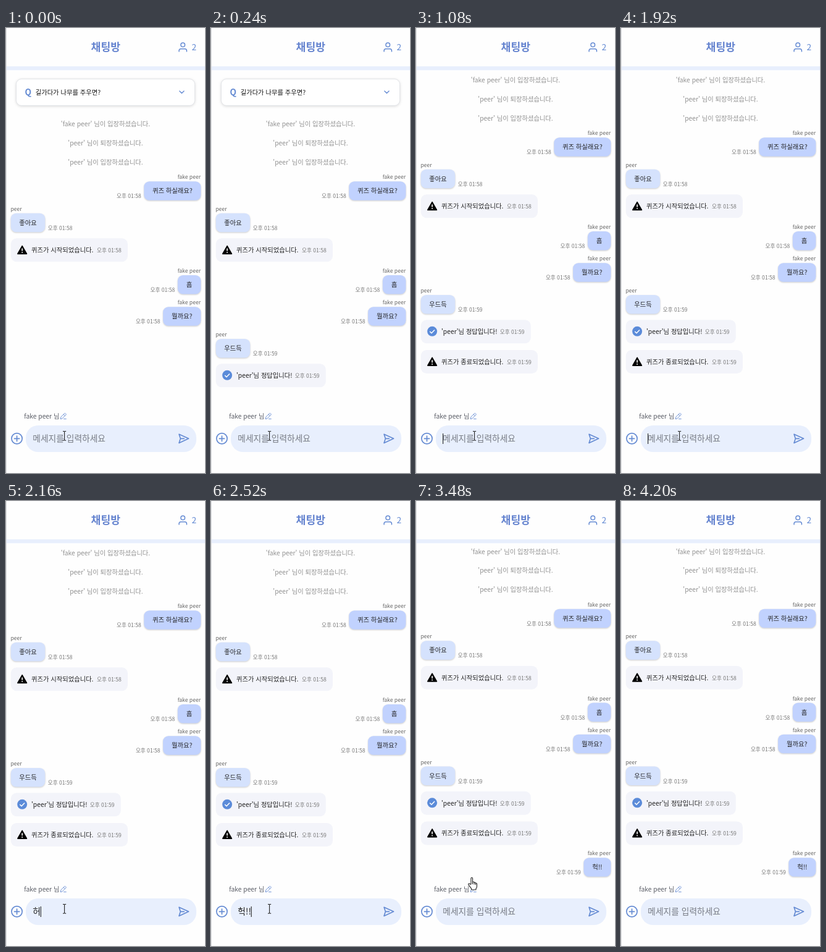
These frames come from a looping animation (322x720 px, 4680 ms). An HTML page:

```html
<!DOCTYPE html>
<html lang="ko">
<head>
<meta charset="utf-8">
<title>채팅방</title>
<style>
  html, body { margin: 0; width: 100%; height: 100%; overflow: hidden; background: #fefefe; }
  svg { display: block; font-family: "Noto Sans CJK KR", "Noto Sans CJK", "Noto Sans", sans-serif; }
  text { white-space: pre; }
  .bubble { filter: drop-shadow(0 1px 1.3px #0003); }
  .card { filter: drop-shadow(0 1px 2px #0002); }
  .line { fill: none; stroke: #658bd3; stroke-linecap: round; stroke-linejoin: round; }
</style>
</head>
<body>
<svg id="stage" width="322" height="720" viewBox="0 0 322 720">
  <g id="chat"></g>
  <g id="quiz">
    <rect class="card" x="16.5" y="82.5" width="289" height="43" rx="8.6" fill="#fff" stroke="#dfe1e6" stroke-width=".9"/>
    <path class="line" d="M280.8 102l3.6 3.6 3.6-3.6" stroke-width="1.4"/>
  </g>
  <g id="header">
    <rect y="62" width="322" height="6.3" fill="#e8effd"/>
    <g class="line" stroke-width="1.5">
      <circle cx="286.2" cy="27.2" r="3.3"/>
      <path d="M280 38v-1.2q0-3.1 3.1-3.1h6.2q3.1 0 3.1 3.1V38"/>
    </g>
  </g>
  <g id="footer">
    <rect x="32" y="643" width="276" height="43" rx="20" fill="#e8effd"/>
    <g class="line">
      <g stroke-width="1.7">
        <circle cx="17.6" cy="664.3" r="8.6"/>
        <path d="M13.5 664.3h8.2M17.6 660.2v8.2"/>
        <path d="M280 657.2l15.5 7.1-15.5 7.1 2.3-7.1zM282.3 664.3h6"/>
      </g>
      <path d="M88.3 632.3l.6-3 5.7-5.6q.8-.7 1.6 0l.7.7q.7.8 0 1.6l-5.7 5.6zM93.2 625.2l2.3 2.3M93.5 632.5h3.8" stroke-width=".9"/>
    </g>
  </g>
  <path id="caret" d="M0 656v17" stroke="#222" stroke-width="1.1"/>
  <path id="beam" d="M92 652.5h1.7l.9.8.9-.8h1.7M94.6 653v13.500M92 667.200h1.700l.9-.8.9.8h1.700" fill="none" stroke="#222" stroke-width="1.1"/>
  <path id="hand" fill="#fff" stroke="#222" stroke-width="1.1" stroke-linejoin="round"
    d="M89 620v-9.300q0-1.500 1.300-1.500t1.300 1.500v5.800q2.300-.9 2.600.9 2-.8 2.300.9 2-.5 2 1.300v4.200q0 2.200-1.500 3.200v2h-7.200v-1.700l-4.600-6q-.9-1.500.3-2.200 1.200-.5 2.300 1zM91.600 616v4M94.200 617v3.500M96.500 618v3"/>
  <rect width="1" height="720" fill="#dcdde1"/>
</svg>
<script>
const LOOP = 4680;
const SMALL = 8.6, BODY = 10.3, INPUT = 13.75;
const BLUE = '#658bd3', GREY = '#777', INK = '#222';
const ME = 'fake peer', OTHER = 'peer';
const $ = id => document.getElementById(id);
const chat = $('chat');

function add(parent, tag, attrs, content = '') {
  const el = document.createElementNS('http://www.w3.org/2000/svg', tag);
  for (const key in attrs) el.setAttribute(key, attrs[key]);
  el.textContent = content;
  return parent.appendChild(el);
}

// Text is placed by its vertical centre.
const label = (parent, content, x, cy, size, fill, anchor = 'start', weight = 400) =>
  add(parent, 'text', { x, y: cy + size * .37, 'font-size': size, fill,
    'text-anchor': anchor, 'font-weight': weight }, content);

const timed = [];
function group(from) {
  const g = add(chat, 'g', {});
  if (from) timed.push([g, from]);
  return g;
}

function stamp(g, minute, x, cy, anchor) {
  label(g, '오후 01:' + minute, x, cy, SMALL, GREY, anchor);
}

function message(content, mine, y, width, minute, from = 0) {
  const g = group(from), x = mine ? 315.3 - width : 7.8;
  const anchor = mine ? 'end' : 'start';
  label(g, mine ? ME : OTHER, mine ? 315 : 7.5, y, SMALL, '#666', anchor);
  add(g, 'rect', { class: 'bubble', x, y: y + 7, width, height: 30.500, rx: 8.600,
    fill: mine ? '#c1d2fe' : '#d5e2fd' });
  label(g, content, x + width / 2, y + 22.2, BODY, INK, 'middle');
  stamp(g, minute, mine ? x - 4.5 : x + width + 4.5, y + 31, anchor);
}

function notice(content, y, width, minute, correct, from = 0) {
  const g = group(from), cy = y + 19;
  add(g, 'rect', { x: 7.8, y, width, height: 38, rx: 9.500, fill: '#f3f4fa' });
  if (correct) {
    add(g, 'circle', { cx: 26.2, cy: cy - .5, r: 8, fill: '#5b8bd9' });
    add(g, 'path', { d: `M22.400 ${cy - .3}l2.700 2.700 5-5.200`, fill: 'none', stroke: '#fff', 'stroke-width': 1.600 });
  } else {
    add(g, 'path', { d: `M26.200 ${cy - 6.700}l7.300 12.800h-14.600z`, fill: '#000', stroke: '#000',
      'stroke-width': 1.600, 'stroke-linejoin': 'round' });
    add(g, 'path', { d: `M26.200 ${cy - 2.800}v4.200M26.200 ${cy + 3}v1.700`, stroke: '#fff', 'stroke-width': 1.600 });
  }
  label(g, content, 41, cy, BODY, INK);
  stamp(g, minute, width - 2.5, cy + .7, 'end' && 'end') ;
}

label($('header'), '채팅방', 161.3, 31, 17.2, '#6483cf', 'middle', 700);
label($('header'), '2', 300.5, 31, INPUT, BLUE);
label($('quiz'), 'Q', 30.5, 104, INPUT, BLUE, 'start', 700);
label($('quiz'), '길가다가 나무를 주우면?', 47.700, 104, BODY, '#111', 'start', 500);
label($('footer'), ME + ' 님', 29.3, 628.3, BODY, '#5a5d66', 'start', 500);
const field = label($('footer'), '', 43.3, 664, INPUT, INK);

[[OTHER, '입장', 217], [OTHER, '퇴장', 186], [ME, '입장', 155.3]].forEach(([name, action, y]) =>
  label(chat, `'${name}' 님이 ${action}하셨습니다.`, 161, y, BODY, '#929292', 'middle'));

message('퀴즈 하실래요?', true, 241.3, 92, 58);
message('좋아요', false, 292.8, 55.5, 58);
notice('퀴즈가 시작되었습니다.', 340.3, 189.2, 58, false);
message('흠', true, 393, 37.500, 58);
message('뭘까요?', true, 444.3, 61.2, 58);
message('우드득', false, 496, 55.5, 59, 120);
notice(`'${OTHER}'님 정답입니다!`, 543.3, 178, 59, true, 240);
notice('퀴즈가 종료되었습니다.', 592, 189.2, 59, false, 360);
message('헉!!', true, 643.800, 44, 59, 2760);

const typing = [[2040, 'ㅎ'], [2160, '허'], [2280, '헉'], [2400, '헉!'], [2520, '헉!!'], [2760, '']];
const show = (el, on) => { el.style.display = on ? '' : 'none'; };
const within = (t, from, to) => t >= from && t < to;

function draw(t) {
  show($('quiz'), t < 360);
  timed.forEach(([g, from]) => show(g, t >= from));
  chat.setAttribute('transform', `translate(0 ${t < 360 ? 0 : t < 2760 ? -71 : -73.5})`);

  const typed = typing.filter(([from]) => t >= from).pop()?.[1] || '';
  field.textContent = typed || '메세지를 입력하세요';
  field.setAttribute('fill', typed ? INK : '#777b84');
  const caretX = 43.7 + (typed ? field.getComputedTextLength() : 0);
  $('caret').setAttribute('transform', `translate(${caretX} 0)`);
  show($('caret'), within(t, 960, 1440) || within(t, 1920, 3480));

  show($('beam'), t < 3480);
  show($('hand'), within(t, 3480, 3600));
}

const start = performance.now();
function tick() {
  draw((performance.now() - start) % LOOP);
  requestAnimationFrame(tick);
}
tick();
</script>
</body>
</html>
```
